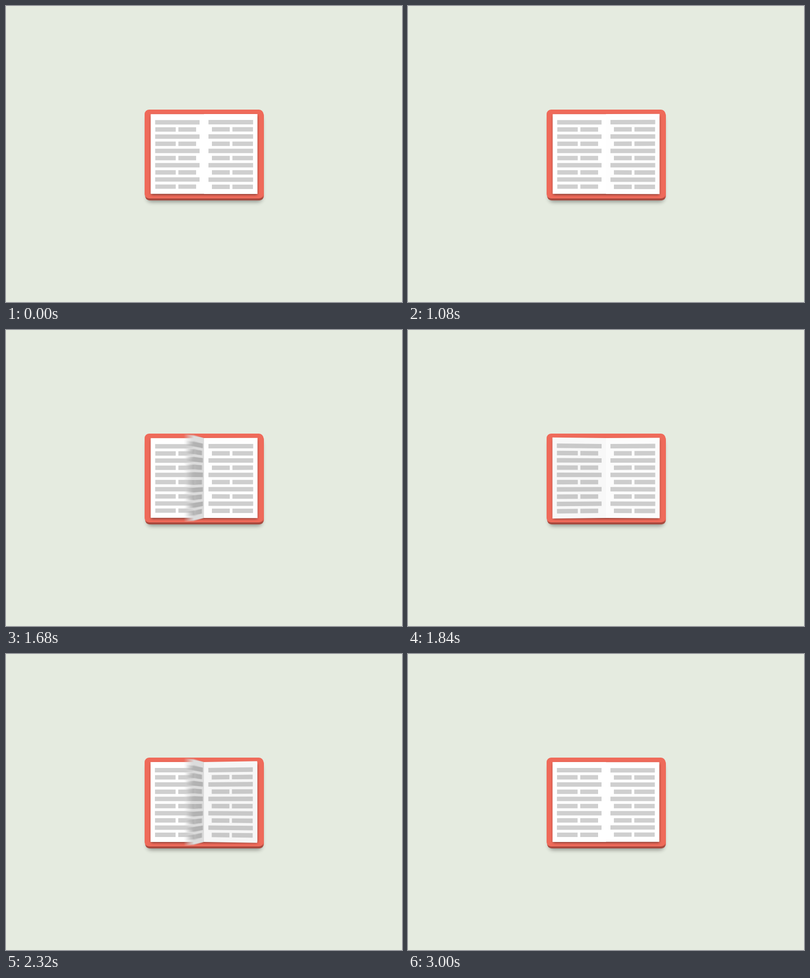
These frames come from a looping animation (800 px wide and 600 px high, 3.08 s). An HTML page with a canvas:

```html
<!DOCTYPE html>
<html lang="en">
<head>
<meta charset="utf-8">
<title>Page turning book</title>
<style>
  html, body { margin: 0; width: 100%; height: 100%; overflow: hidden; background: #e5ebe0; }
  canvas { display: block; }
</style>
</head>
<body>
<canvas id="stage" width="800" height="600"></canvas>
<script>
const LOOP = 3080, STEP = 40;
const SHUTTER = 20, SAMPLES = 16;
const SPINE = 400, MIDDLE = 300, CAMERA = 1150;
const PAGE_W = 108, PAGE_H = 162;
const TURN_TIMES = [1707, 2347, 2667], TURN_PACE = 130;

const layer = () => Object.assign(document.createElement('canvas'), { width: 800, height: 600 });
const stage = document.getElementById('stage').getContext('2d');
const scene = layer().getContext('2d');
const book = layer();

// Slow start, fast finish: 0 to PI.
const turnAngle = (time, center) =>
  Math.PI * (1 - Math.exp(-Math.exp((time - center) / TURN_PACE)));

function roundRect(ctx, x, y, w, h, radius, fill) {
  ctx.fillStyle = fill;
  ctx.beginPath();
  ctx.roundRect(x, y, w, h, radius);
  ctx.fill();
}

function setShadow(ctx, color, blur, offsetY) {
  ctx.shadowColor = color;
  ctx.shadowBlur = blur;
  ctx.shadowOffsetY = offsetY;
}

// Draws one sheet hinged at the spine; y is measured from the middle of the sheet.
function drawPage(ctx, angle, size = 1) {
  const cos = Math.cos(angle) * size, sin = Math.sin(angle);
  const light = 1 - 0.14 * sin;
  const gray = level => `rgb(${Array(3).fill(Math.round(level * light))})`;

  function quad(x1, y1, x2, y2) {
    ctx.beginPath();
    for (const [x, y] of [[x1, y1], [x2, y1], [x2, y2], [x1, y2]]) {
      const scale = CAMERA / (CAMERA - x * sin);
      ctx.lineTo(SPINE + x * cos * scale, MIDDLE + y * size * scale);
    }
    ctx.fill();
  }

  ctx.fillStyle = gray(255);
  quad(0, -PAGE_H / 2, PAGE_W, PAGE_H / 2);
  ctx.fillStyle = gray(207);
  for (let row = 0; row < 10; row++) {
    const top = -69 + row * 14.55, bottom = top + 9;
    if (row % 2) {
      quad(16, top, 52, bottom);
      quad(57.4, top, 98.9, bottom);
    } else {
      quad(9, top, 99.2, bottom);
    }
  }
}

function drawBook(ctx) {
  ctx.fillStyle = '#e5ebe0';
  ctx.fillRect(0, 0, 800, 600);

  setShadow(ctx, 'rgba(0,0,0,.4)', 8, 4);
  roundRect(ctx, 285, 220, 232, 173, 8, '#a8493e');
  setShadow(ctx, 'transparent', 0, 0);

  const side = ctx.createLinearGradient(0, 384, 0, 390);
  side.addColorStop(0, '#ec6757');
  side.addColorStop(1, '#a8493e');
  roundRect(ctx, 281, 213, 240, 181, 9, side);
  roundRect(ctx, 280, 210, 240, 180, 9, '#ef6a5a');

  setShadow(ctx, 'rgba(0,0,0,.5)', 5, 2);
  roundRect(ctx, 292.5, 219.5, 215, 161, 0, '#fff');
  setShadow(ctx, 'transparent', 0, 0);

  drawPage(ctx, 0, 0.995);
  drawPage(ctx, Math.PI, 0.995);
}

function drawScene(time) {
  scene.drawImage(book, 0, 0);
  const angles = TURN_TIMES.map(center => turnAngle(time, center));
  const isRight = angle => angle < Math.PI / 2;
  const right = angles.filter(isRight).reverse();
  const left = angles.filter(angle => !isRight(angle));
  for (const angle of [...right, ...left]) drawPage(scene, angle);
}

function render(now) {
  const time = Math.floor(now % LOOP / STEP) * STEP;
  // Running average of samples across the open shutter gives motion blur.
  for (let i = 0; i < SAMPLES; i++) {
    drawScene(time + SHUTTER * (i + 0.5) / SAMPLES);
    stage.globalAlpha = 1 / (i + 1);
    stage.drawImage(scene.canvas, 0, 0);
  }
}

drawBook(book.getContext('2d'));
const start = performance.now();
function tick() {
  render(performance.now() - start);
  requestAnimationFrame(tick);
}
tick();
</script>
</body>
</html>
```
